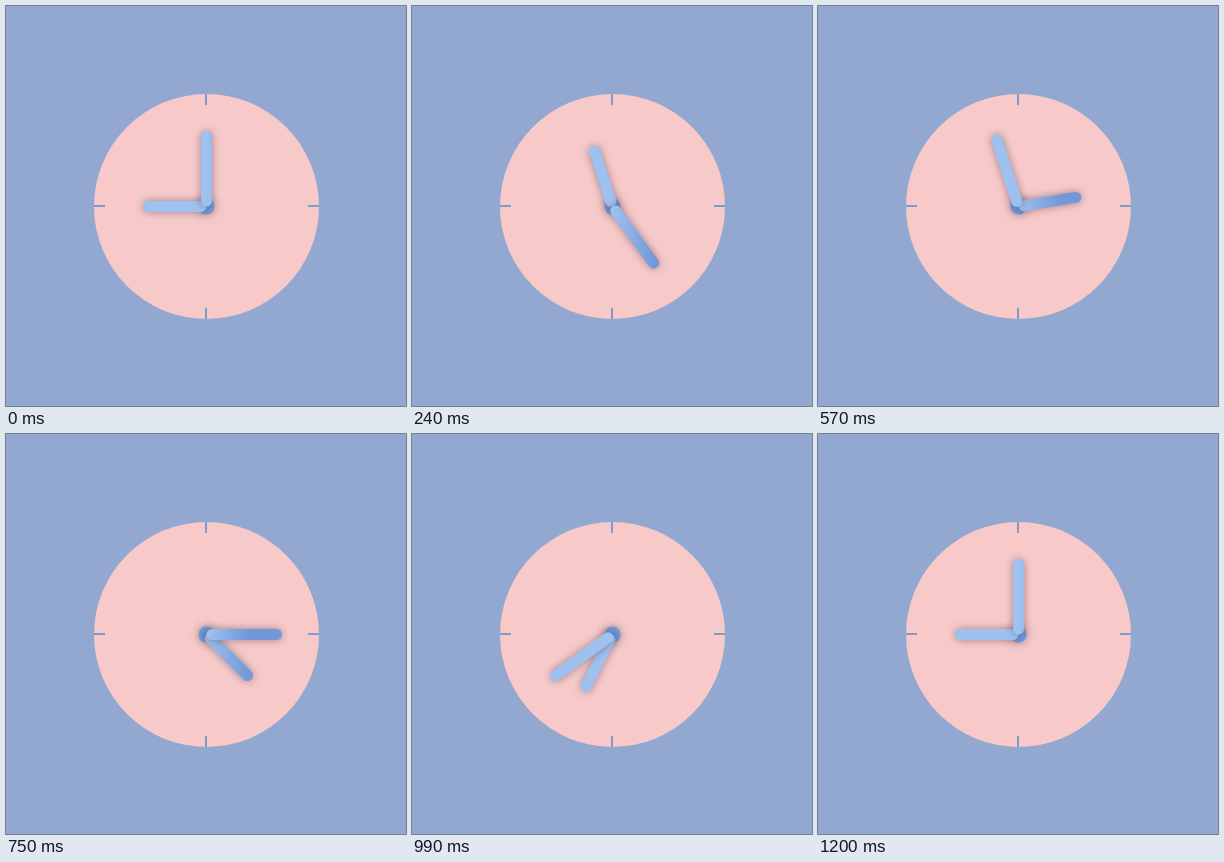
Write an HTML page with a canvas that moves like this. It is 400 by 400 pixels and loops after 1.27 s.

```html
<!DOCTYPE html>
<html lang="en">
<head>
<meta charset="utf-8">
<title>Clock</title>
<style>
  html, body { margin: 0; width: 100%; height: 100%; overflow: hidden; background: #93a8d1; }
  canvas { display: block; width: 400px; height: 400px; }
</style>
</head>
<body>
<canvas id="clock" width="400" height="400"></canvas>
<script>
const LOOP = 1270, TURN = 1200, STEP = 30;
const MID = 200.5, RADIUS = 112.5, WIDTH = 11;
const ctx = document.getElementById('clock').getContext('2d');

// Light falls from the left, so hands darken as they swing right.
const tint = ctx.createLinearGradient(MID, 0, MID + 42, 0);
tint.addColorStop(0, '#9fc1ef');
tint.addColorStop(1, '#7199d8');

function disc(r, color) {
  ctx.fillStyle = color;
  ctx.beginPath();
  ctx.arc(MID, MID, r, 0, Math.PI * 2);
  ctx.fill();
}

function ticks() {
  ctx.fillStyle = '#7c9ccd';
  for (const p of [88, 302]) {
    ctx.fillRect(199, p, 2, 11);
    ctx.fillRect(p, 199, 11, 2);
  }
}

function shadow(on) {
  ctx.shadowColor = on ? 'rgba(70, 50, 80, 0.5)' : 'transparent';
  ctx.shadowBlur = on ? 8 : 0;
}

function hand(turns, length) {
  const a = turns * Math.PI * 2, dx = Math.sin(a), dy = -Math.cos(a);
  const start = WIDTH / 2;
  ctx.strokeStyle = tint;
  ctx.lineWidth = WIDTH;
  ctx.lineCap = 'round';
  ctx.beginPath();
  ctx.moveTo(MID + dx * start, MID + dy * start);
  ctx.lineTo(MID + dx * length, MID + dy * length);
  ctx.stroke();
}

function draw(time) {
  const t = Math.min(Math.floor((time % LOOP) / STEP) * STEP, TURN);
  const turn = t / TURN;
  ctx.fillStyle = '#93a8d1';
  ctx.fillRect(0, 0, 400, 400);
  disc(RADIUS, '#f7cac9');
  ticks();
  shadow(true);
  disc(8, '#6f9ada');
  hand(0.75 + turn, 58);
  hand(2 * turn, 70);
  shadow(false);
}

let origin;
function tick(now) {
  origin ??= now;
  draw(now - origin);
  requestAnimationFrame(tick);
}
draw(0);
requestAnimationFrame(tick);
</script>
</body>
</html>
```
